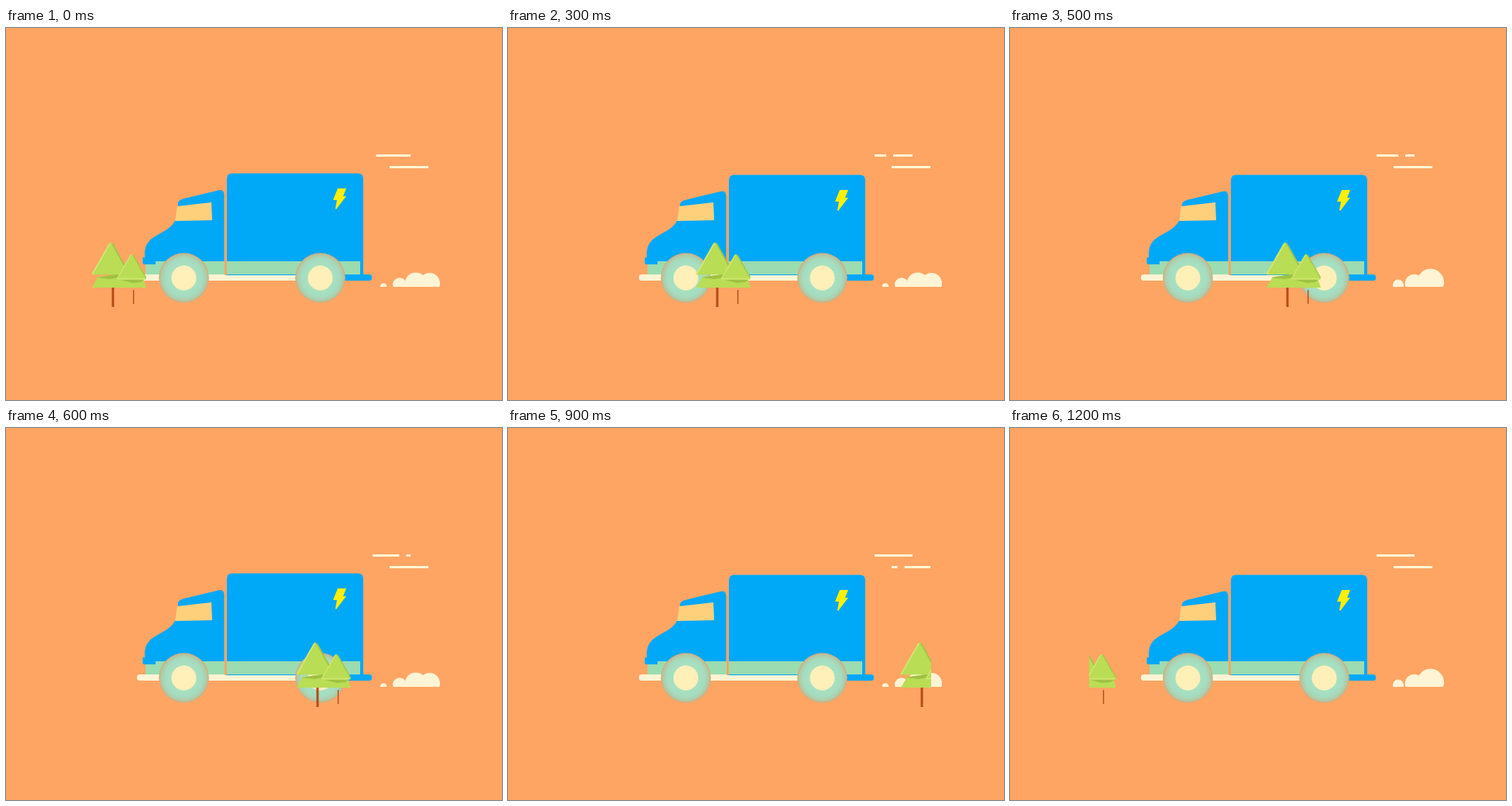
Recreate the animation shown at these times as an HTML page. Size 640 px wide and 480 px high, loop 1.3 s.

```html
<!DOCTYPE html>
<html lang="en">
<head>
<meta charset="utf-8">
<title>Delivery truck</title>
<style>
  html, body { margin: 0; height: 100%; overflow: hidden; background: #ffa564; }
  svg { display: block; width: 100%; height: 100%; }
</style>
</head>
<body>
<svg viewBox="0 0 640 480">
  <defs>
    <radialGradient id="tyre">
      <stop offset=".5" stop-color="#a9e0c0"/>
      <stop offset=".76" stop-color="#a4dcc0"/>
      <stop offset=".92" stop-color="#b4c8a2"/>
      <stop offset="1" stop-color="#d2a87c"/>
    </radialGradient>
    <clipPath id="road"><rect x="102" y="260" width="444" height="110"/></clipPath>
    <clipPath id="ground"><rect x="475" y="300" width="85" height="34"/></clipPath>
    <g id="wheel">
      <circle r="32.3" fill="url(#tyre)"/>
      <circle r="16" fill="#fff0ba"/>
    </g>
  </defs>

  <rect width="640" height="480" fill="#ffa564"/>

  <g fill="#fff4d4">
    <rect x="473" y="163" width="49" height="3"/>
    <rect x="495" y="178" width="50" height="3"/>
  </g>
  <g fill="#ffa564">
    <rect id="upperGap" y="162" width="9" height="5"/>
    <rect id="lowerGap" y="177" width="9" height="5"/>
  </g>

  <g id="smoke" fill="#fff4d4" clip-path="url(#ground)"></g>

  <rect x="169" y="318" width="230" height="8" rx="3.5" fill="#fff4d4"/>
  <rect x="420" y="318" width="52" height="8" rx="3.5" fill="#00a8f8"/>
  <path id="cab" fill="#00a8f8"/>
  <path id="cargo" fill="#00a8f8"/>
  <path d="M180 305H193V301H282V318H180ZM285 301H457V318H285Z" fill="#9bdcb0"/>
  <path d="M282 300H285V319H282Z" fill="#ffa564"/>
  <path d="M221 230L265 225L266 248L218 249Z" fill="#ffd07c"/>
  <path id="bolt" d="M428 207H439L435 217H439L426 234L425 233L427 222H422Z" fill="#fff000"/>
  <use href="#wheel" x="229.5" y="322.5"/>
  <use href="#wheel" x="405.5" y="322.5"/>

  <g clip-path="url(#road)">
    <g id="trees" stroke-linejoin="round">
      <path d="M138 335V360" stroke="#b44c18" stroke-width="3"/>
      <path d="M111 335L119 321L155 317L160 335Z" fill="#b9dd54"/>
      <path d="M117 322L155 316L156 320L134 324Z" fill="#9fc142"/>
      <path d="M135 277.5L112 317.5L158 317Z" fill="#b9dd54" stroke="#b9dd54" stroke-width="2"/>
      <path d="M134 278L111.500 317.500" stroke="#d0e673" stroke-width="2"/>
      <path d="M137 278L157 314" stroke="#a3c546" stroke-width="2"/>
      <path d="M164.600 338V356" stroke="#b44c18" stroke-width="1.400"/>
      <path d="M143 335L150 323H177L181 335Z" fill="#b9dd54"/>
      <path d="M148 325H178L174 328L163 329Z" fill="#9fc142"/>
      <path d="M162 292.500L144 323.500H180Z" fill="#b9dd54" stroke="#b9dd54" stroke-width="2"/>
      <path d="M161 293L143.500 323.500H179" fill="none" stroke="#d0e673" stroke-width="1.500"/>
      <path d="M164 293L180.500 322" stroke="#a3c546" stroke-width="1.500"/>
    </g>
  </g>
</svg>
<script>
  const STEP = 100, STEPS = 13;
  const $ = id => document.getElementById(id);

  // Puffs drift right, swell, then shrink against the right edge.
  function smokePuffs(phase) {
    let out = '';
    for (let i = phase; i < 11; i += 3) {
      const height = i < 9 ? 4.8 + 2.3 * i : 18 - 6 * (i - 9);
      const r = Math.max(4.2, height * 0.75);
      const x = Math.min(487 + 6.95 * i, 560 - r);
      out += `<circle cx="${x}" cy="${334 - height + r}" r="${r}"/>`;
    }
    return out;
  }

  function draw(time) {
    const index = Math.floor(time / STEP) % STEPS;
    const n = index === STEPS - 1 ? -1 : index;
    // The roof bounces every six steps while the lower body stays level.
    const lift = [0, -2, 0, 2, 3, 2][(n + 6) % 6];
    const roof = 209.5 + lift * 0.75, top = 187.5 + lift;

    $('cab').setAttribute('d', `M218 249L222 229V${roof + 16}Q223 ${roof + 13} 228 ${roof + 11}
      L274 ${roof}Q281 ${roof - 2} 281.5 ${roof + 6}V301H193V305H178Q176.500 305 176.500 303V296
      H179V289Q180 276 192 269L206 261Q215 255 218 249Z`);
    $('cargo').setAttribute('d', `M285 318V${top + 7}Q285 ${top} 292 ${top}
      H454Q461 ${top} 461 ${top + 7}V319H285Z`);
    $('bolt').setAttribute('transform', `translate(0 ${lift})`);
    $('trees').setAttribute('transform', `translate(${44 * n} 0)`);
    $('upperGap').setAttribute('x', 468.5 + 6.5 * n);
    $('lowerGap').setAttribute('x', 490 + 6.3 * (n - 7));
    $('smoke').innerHTML = smokePuffs((n + 3) % 3);
  }

  function tick(now) {
    draw(now);
    requestAnimationFrame(tick);
  }
  draw(0);
  requestAnimationFrame(tick);
</script>
</body>
</html>
```
